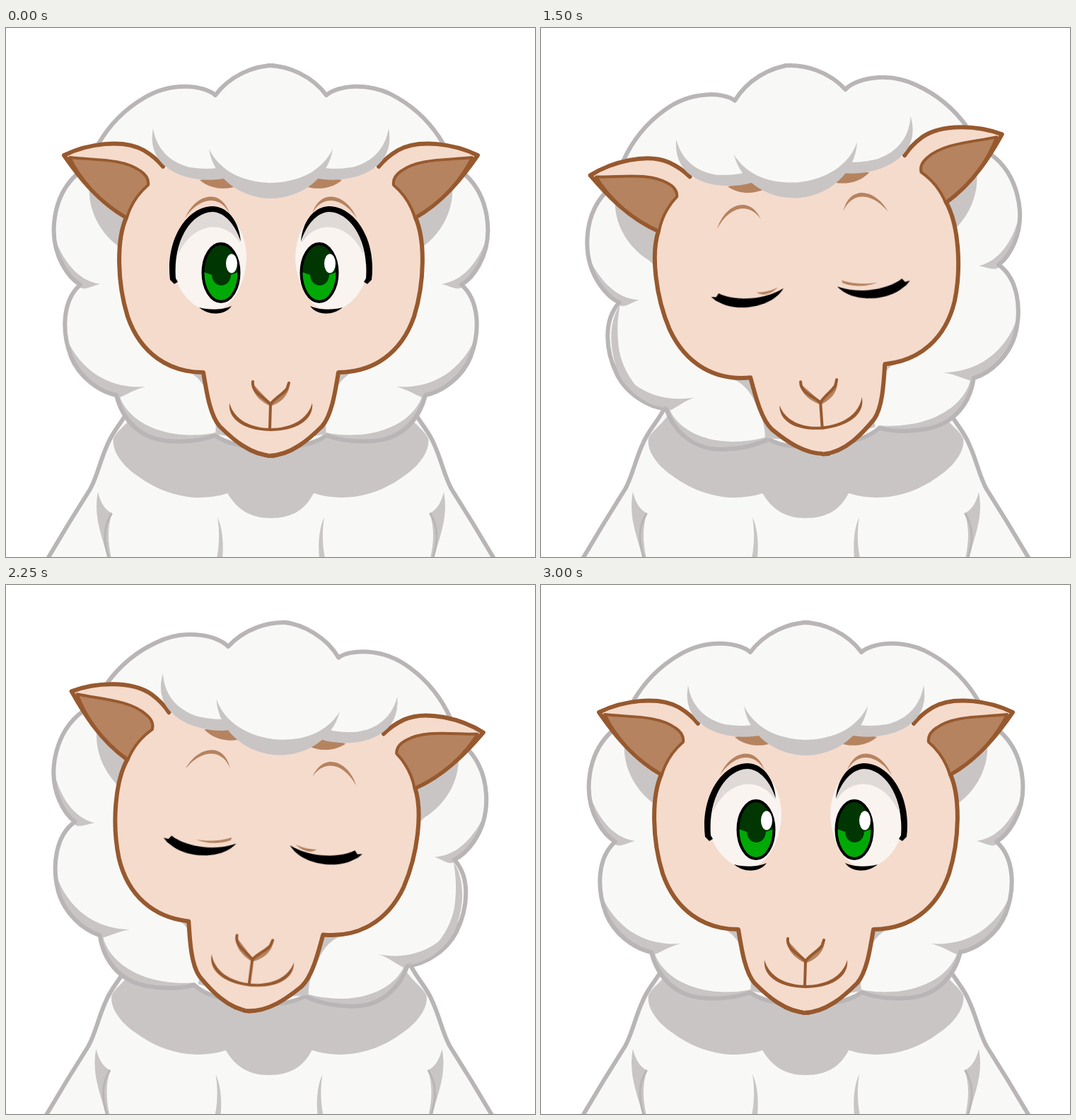
Write an HTML page that moves like this. It is 748 by 748 pixels and loops after 3.25 s.

```html
<!DOCTYPE html>
<html lang="en">
<head>
<meta charset="utf-8">
<title>Sheep</title>
<style>
  html, body { margin: 0; width: 100%; height: 100%; overflow: hidden; background: #fff; }

  svg {
    --wool: #f8f9f7;
    --shade: #c9c5c5;
    --rim: #b9b5b6;
    --skin: #f5dbcc;
    --brown: #97592e;
    --tan: #b5835f;
    display: block;
    width: 100%;
    height: 100%;
    stroke-linecap: round;
    stroke-linejoin: round;
    animation: sway 3250ms step-end infinite;
  }

  /* turn: head angle, side: tilt direction, shut: eyes closed, far: full tilt */
  @keyframes sway {
    0%, 53.846%, 92.308%, 100% { --turn: 0; --x: 0; --y: 0; --side: 1; --shut: 0; --far: 0; --body: 0; }
    11.385%, 49.846% { --turn: -3; --x: 3; --y: -1.5; --side: -1; --shut: 0; --far: 0; --body: 0; }
    15.385%, 46.154% { --turn: -5.7; --x: 4.5; --y: -1.5; --side: -1; --shut: 1; --far: 0; --body: 0; }
    19.077% { --turn: -12.9; --x: 1; --y: -1; --side: -1; --shut: 0; --far: 1; --body: 0; }
    65.231%, 88.308% { --turn: 3; --x: -6; --y: -1.5; --side: 1; --shut: 0; --far: 0; --body: -2.5; }
    69.231%, 84.615% { --turn: 5.7; --x: -9; --y: -1.5; --side: 1; --shut: 1; --far: 0; --body: -2.5; }
    72.923% { --turn: 12.9; --x: -4; --y: -1; --side: 1; --shut: 0; --far: 1; --body: -2.5; }
  }

  .flip { transform: matrix(-1, 0, 0, 1, 749, 0); }
  .body { transform: translateX(calc(var(--body) * 1px)); }
  .head {
    transform-origin: 374px 364px;
    transform: translate(calc(var(--x) * 1px), calc(var(--y) * 1px)) rotate(calc(var(--turn) * 1deg));
  }
  .cast { transform: translateX(calc(var(--turn) * .9px)); }
  .low-side { opacity: calc(var(--turn) * var(--side) / 5); }
  .sided { transform-origin: 374.5px 0; transform: scaleX(var(--side)); }
  .brows { transform: translateY(calc(var(--shut) * 4px)); }
  .open { opacity: calc(1 - var(--shut)); }
  .closed { opacity: var(--shut); }
  .near-lobe { opacity: calc(1 - var(--far)); }
  .far-lobe { opacity: var(--far); }

  .wool { fill: var(--wool); }
  .shade { fill: var(--shade); }
  .rim { stroke: var(--rim); stroke-width: 6; }
  .skin { fill: var(--skin); }
  .line { stroke: var(--brown); stroke-width: 6; }
  .brown { fill: var(--brown); }
  .tan { fill: var(--tan); }
  .none { fill: none; }
</style>
</head>
<body>
<svg viewBox="0 0 748 748" preserveAspectRatio="none">
  <defs>
    <g id="torso">
      <path class="wool rim" d="M378 500H190C172 556 155 560 143 590C133 612 129 634 119 652C98 685 79 716 58 752H378"/>
      <path class="shade" d="M130 656C133 670 140 682 150 686C143 706 144 728 149 750H144C136 718 123 692 130 656M299 692C306 706 308 728 306 750H298C302 730 302 710 299 692"/>
      <path class="rim none" style="stroke-width:3" d="M149 687C137 706 138 726 146 752"/>
    </g>
    <path id="collar" class="shade" d="M378 520H195C178 560 160 564 152 580C149 599 166 620 187 634C222 660 268 672 313 658L378 658"/>

    <path id="fleece" d="M378 53C350 53 316 68 296 95C282 82 236 74 195 99C166 116 146 137 130 165L100 207C66 238 58 295 80 335C86 346 95 357 105 363C80 385 78 428 92 465C103 492 130 514 156 519C164 552 188 581 230 584C258 586 280 582 296 576C312 588 335 593 378 593"/>
    <g id="wool">
      <use href="#fleece" class="wool"/>
      <path class="shade" d="M70 300C84 335 105 358 133 362C121 365 114 370 107 368C85 352 72 328 70 300M86 440C108 488 150 511 198 507C184 510 172 518 159 523C120 514 92 485 86 440M160 519C172 556 215 573 250 575C268 576 285 575 296 572L298 579C240 592 168 590 158 520"/>
      <use href="#fleece" class="rim none"/>
    </g>
    <path id="cast" class="shade" d="M118 222C115 258 134 290 158 308L174 328L205 262L110 212ZM256 486C270 490 282 505 288 525C296 545 298 562 296 574L330 580L300 480Z"/>
    <path id="crescent" class="shade" d="M106 366C87 388 83 428 95 465C106 492 130 512 156 518C126 503 101 468 98 430C97 402 101 382 106 366"/>

    <g id="face">
      <path class="skin line" d="M222 196C214 186 205 179 195 173C165 156 114 164 82 180C100 206 128 244 170 268C156 300 157 360 172 408C190 460 230 487 279 487C284 518 289 548 302 563C319 580 346 605 378 605"/>
      <path class="skin" d="M224 198H378V603L230 400Z"/>
      <path class="tan" style="stroke:var(--brown);stroke-width:4" d="M90 183C125 187 165 184 190 202C199 208 202 215 201 222C187 234 176 251 171 268C128 243 103 210 90 183Z"/>
      <path class="tan" d="M274 215C288 227 306 229 322 225L310 208Z"/>
    </g>

    <g id="fringe">
      <path class="shade" d="M208 142C202 173 216 197 250 209C272 216 295 216 312 212V180Z"/>
      <path class="wool" d="M208 142C213 172 232 190 260 197C280 200 295 199 306 197L310 150Z"/>
      <path class="shade" d="M375 241C332 241 293 212 287 171L375 160Z"/>
      <path class="wool" d="M378 219C335 219 302 202 287 171L378 140Z"/>
    </g>

    <path id="crease" class="tan" d="M253 269C268 234 304 226 316 262C302 236 274 238 253 269"/>
    <path id="smile" class="brown" d="M316 530C322 553 345 566 376 566V570C342 570 313 556 316 530"/>

    <g id="eye">
      <path fill="#f9f4f0" d="M240 355C234 300 262 259 295 259C326 261 340 295 340 326C338 366 318 399 290 401C268 399 248 378 240 355"/>
      <path fill="#dfdad8" d="M243 321C247 284 268 259 295 259C316 262 328 280 331 304C310 270 264 274 243 321"/>
      <path d="M232 356C225 300 255 252 293 252C314 253 330 274 332 302C324 278 310 261 292 260C262 261 236 300 240 354L243 359L238 362Z"/>
      <path d="M273 395C285 399 306 399 319 393C310 407 286 407 273 395"/>
    </g>
    <g id="iris">
      <ellipse cx="304" cy="346" rx="25.5" ry="41" fill="#003602"/>
      <path fill="#00a906" d="M279 345L291 349C292 369 317 369 318 349L329 345C331 368 319 386 304 386C289 386 277 368 279 345"/>
      <ellipse cx="304" cy="346" rx="25.5" ry="41" fill="none" stroke="#000" stroke-width="4"/>
      <ellipse cx="319" cy="333" rx="8" ry="13.5" fill="#fff"/>
    </g>
    <path id="lid" d="M232 373L239 374L243 369C266 383 305 385 335 371C317 396 268 399 243 382L238 379Z"/>
  </defs>

  <g class="body">
    <use href="#torso"/>
    <use href="#torso" class="flip"/>
    <use href="#collar"/>
    <use href="#collar" class="flip"/>
    <path class="shade near-lobe" d="M312 656C326 680 344 693 374 693C406 693 424 680 436 656V640H312Z"/>
    <g class="sided">
      <path class="shade far-lobe" d="M302 660C319 680 330 702 359 702C389 702 414 680 441 658L374 640Z"/>
    </g>
  </g>

  <g class="head">
    <use href="#wool"/>
    <use href="#wool" class="flip"/>
    <g class="low-side">
      <g class="sided"><use href="#crescent" class="flip"/></g>
    </g>
    <g class="cast">
      <use href="#cast"/>
      <use href="#cast" class="flip"/>
    </g>
    <use href="#face"/>
    <use href="#face" class="flip"/>
    <use href="#fringe"/>
    <use href="#fringe" class="flip"/>
    <g class="brows">
      <use href="#crease"/>
      <use href="#crease" class="flip"/>
    </g>

    <g class="open">
      <use href="#eye"/>
      <use href="#eye" class="flip"/>
      <use href="#iris"/>
      <use href="#iris" x="139"/>
    </g>
    <g class="closed">
      <g class="sided">
        <use href="#lid"/>
        <use href="#lid" class="flip" x="3" y="-5"/>
        <path class="tan" d="M278 371C295 372 312 370 328 363L327 367C312 374 295 376 278 371M419 364C430 368 438 369 449 368C442 375 428 372 419 364"/>
      </g>
    </g>

    <path class="tan" d="M348 502C348 518 360 528 374 535C388 530 400 520 401 504L374 530Z"/>
    <path class="skin" d="M352 502L374 529L397 503Z"/>
    <path class="none" style="stroke:var(--brown);stroke-width:4" d="M349 500C347 515 364 521 374 532C382 521 397 515 398 508L400 502M374 532L373 566"/>
    <use href="#smile"/>
    <use href="#smile" class="flip"/>
  </g>
</svg>
</body>
</html>
```
